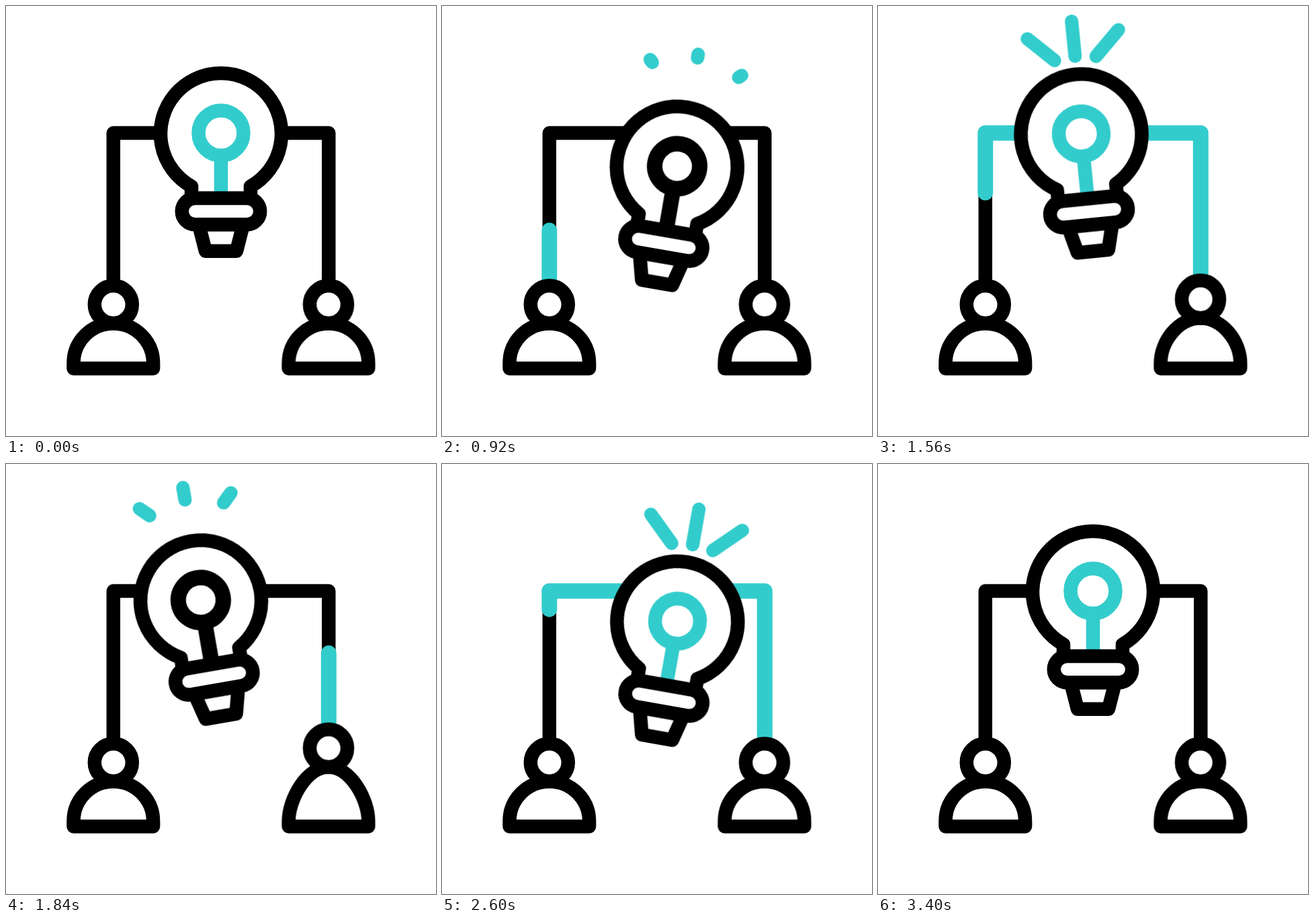
Write an HTML page that moves like this. It is 640 px wide and 640 px high and loops after 3600 ms.

```html
<!DOCTYPE html>
<html lang="en">
<head>
<meta charset="utf-8">
<title>Shared idea</title>
<style>
  html, body { margin: 0; height: 100%; overflow: hidden; background: #fff; }
  svg { display: block; width: 100vw; height: 100vh; }

  svg * {
    animation-duration: 3.6s;
    animation-iteration-count: infinite;
    animation-timing-function: cubic-bezier(.3333, 0, .6667, 1);
  }
  .ink, .teal {
    fill: none;
    stroke: #000;
    stroke-width: 20.5;
    stroke-linecap: round;
    stroke-linejoin: round;
  }
  .teal { stroke: #33cccc; }
  .solid { fill: #fff; }
  .wide { stroke-width: 23; }

  .trim { stroke-dasharray: 100 300; stroke-dashoffset: 100.1; }
  .signal { animation-name: signal; }
  .rays { stroke-width: 20; }
  .rays path { animation-name: shine; }

  .bob { animation-name: bob; }
  .swing { animation-name: swing; transform-origin: 320px 365px; }
  .dim { opacity: 0; animation-name: dim; }

  .head { animation-name: hop; }
  .body {
    d: path("M100.5 539.5V531.5C100.5 499 127 472.4 159.8 472.4C192.5 472.4 219.1 499 219.1 531.5V539.5Z");
    animation-name: stretch;
  }
  .late * { animation-delay: 1.4s; }

  @keyframes bob {
    0%, 44.444%, 88.889%, 100% { transform: translateY(0); }
    22.222%, 66.667% { transform: translateY(50px); }
  }
  @keyframes swing {
    0%, 94.444%, 100% { transform: rotate(0deg); }
    27.778%, 72.222% { transform: rotate(10deg); }
    50% { transform: rotate(-10deg); }
  }
  @keyframes hop {
    0%, 22.222%, 100% { transform: translateY(0); }
    11.111% { transform: translateY(-22px); }
  }
  @keyframes stretch {
    0%, 22.222%, 100% {
      d: path("M100.5 539.5V531.5C100.5 499 127 472.4 159.8 472.4C192.5 472.4 219.1 499 219.1 531.5V539.5Z");
    }
    11.111% {
      d: path("M100.5 539.5V531.5C100.5 499 127 450.4 159.8 450.4C192.5 450.4 219.1 499 219.1 531.5V539.5Z");
    }
  }
  /* runs left to right, then back */
  @keyframes signal {
    0%, 22.222%, 94.444%, 100% { stroke-dashoffset: 100.1; }
    38.889%, 77.778% { stroke-dashoffset: 0; }
    55.556%, 61.111% { stroke-dashoffset: -100.1; }
  }
  /* three bursts: grow outwards, then leave outwards */
  @keyframes shine {
    0%, 5.556%, 27.779%, 33.333%, 55.557%, 61.111% { stroke-dashoffset: 100.1; }
    16.667%, 44.444%, 72.222% { stroke-dashoffset: 0; }
    27.778%, 55.556%, 83.333%, 100% { stroke-dashoffset: -100.1; }
  }
  @keyframes dim {
    0%, 16.667%, 33.333%, 44.444%, 61.111%, 72.222%, 88.889%, 100% { opacity: 0; }
    22.222%, 27.778%, 50%, 55.556%, 77.778%, 83.333% { opacity: 1; }
  }
</style>
</head>
<body>
<svg viewBox="0 0 640 640">
  <path class="ink" d="M159.8 415V189H480.3V415"/>
  <path class="teal wide trim signal" pathLength="100" d="M159.8 415V189H480.3V415"/>

  <g>
    <path class="ink solid body"/>
    <circle class="ink solid head" cx="159.8" cy="444.2" r="28"/>
  </g>
  <g class="late" transform="translate(320.2)">
    <path class="ink solid body"/>
    <circle class="ink solid head" cx="159.8" cy="444.2" r="28"/>
  </g>

  <g class="bob">
    <g class="swing">
      <g class="teal rays">
        <path class="trim" pathLength="100" d="M291.3 76.4L253.3 39.4"/>
        <path class="trim" pathLength="100" d="M322.4 73.3V19.5"/>
        <path class="trim" pathLength="100" d="M353.5 76.4L391.5 39.4"/>
      </g>
      <path class="ink solid" d="M276 286V268.5A90 90 0 1 1 364 268.5V286"/>
      <path class="teal" d="M320 222.5V286M320 155.5a33.5 33.5 0 1 1 0 67a33.5 33.5 0 1 1 0 -67"/>
      <path class="ink wide dim" d="M320 222.5V286M320 155.5a33.5 33.5 0 1 1 0 67a33.5 33.5 0 1 1 0 -67"/>
      <path class="ink solid" d="M286.8 325L297 364.8H343L353.2 325Z"/>
      <rect class="ink solid" x="261.8" y="286" width="116.4" height="39.3" rx="19.6"/>
    </g>
  </g>
</svg>
</body>
</html>
```
